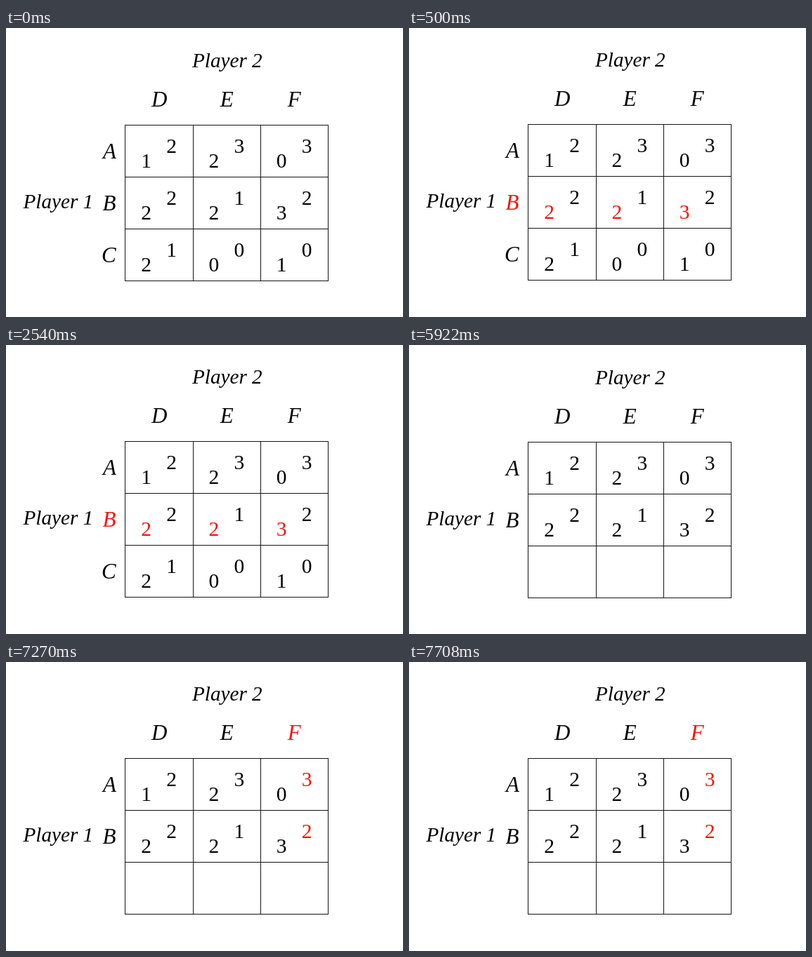
Animation of 565x412 px, one loop 8000 ms. Source, as an HTML page with a canvas:

```html
<!DOCTYPE html>
<html lang="en">
<head>
<meta charset="utf-8">
<title>Dominated strategies</title>
<style>
html, body { margin: 0; width: 100%; height: 100%; overflow: hidden; background: #fff; }
canvas { display: block; }
</style>
</head>
<body>
<canvas id="stage" width="565" height="412"></canvas>
<script>
const ctx = document.getElementById('stage').getContext('2d');
const LOOP = 8000;
const SERIF = '"Liberation Serif", "Times New Roman", serif';
const DIGIT = '29.5px ' + SERIF;
const TITLE = 'italic 29.2px ' + SERIF;
const LETTER = 'italic 31px ' + SERIF;
const BLACK = '#000', RED = '#f3140a';

const left = 169.67, top0 = 138, colStep = 96.33, rowStep = 74;
const rowNames = ['A', 'B', 'C'];
const colNames = ['D', 'E', 'F'];
// Each cell: payoff of player 1, payoff of player 2
const payoffs = [
  ['12', '23', '03'],
  ['22', '21', '32'],
  ['21', '00', '10']
];

// lift: pixels the table sits higher; rows: filled rows; row/col: highlighted choice
const steps = [
  { start: 0, lift: 0, rows: 3 },
  { start: 500, lift: 1, rows: 3, row: 1 },
  { start: 3900, lift: 0, rows: 2 },
  { start: 7270, lift: 1, rows: 2, col: 2 }
];

// Centres the visible ink, so slanted letters sit where they look centred
function label(text, x, y, font, color = BLACK) {
  ctx.font = font;
  ctx.fillStyle = color;
  const m = ctx.measureText(text);
  const shift = (m.actualBoundingBoxRight - m.actualBoundingBoxLeft) / 2;
  ctx.fillText(text, x - shift, y);
}

function drawGrid() {
  ctx.fillStyle = '#141414';
  const x0 = Math.floor(left);
  for (let i = 0; i < 4; i++) {
    ctx.fillRect(Math.floor(left + i * colStep), top0, 1, 3 * rowStep + 1);
    ctx.fillRect(x0, top0 + i * rowStep, 290, 1);
  }
}

function draw(step) {
  ctx.setTransform(1, 0, 0, 1, 0, 0);
  ctx.fillStyle = '#fff';
  ctx.fillRect(0, 0, 565, 412);
  ctx.translate(0, -step.lift);

  label('Player 2', 314, 56, TITLE);
  label('Player 1', 72.5, 257, TITLE);
  drawGrid();

  colNames.forEach((name, c) => {
    label(name, 217.5 + c * colStep, 112, LETTER, c === step.col ? RED : BLACK);
  });
  for (let r = 0; r < step.rows; r++) {
    const y = top0 + r * rowStep;
    const rowColor = r === step.row ? RED : BLACK;
    label(rowNames[r], 147, y + 48, LETTER, rowColor);
    payoffs[r].forEach((pair, c) => {
      const x = left + c * colStep;
      label(pair[0], x + 30, y + 61, DIGIT, rowColor);
      label(pair[1], x + 66, y + 40, DIGIT, c === step.col ? RED : BLACK);
    });
  }
}

const begin = performance.now();
function tick() {
  const t = (performance.now() - begin) % LOOP;
  draw(steps.filter(s => s.start <= t).pop());
  requestAnimationFrame(tick);
}
tick();
</script>
</body>
</html>
```
